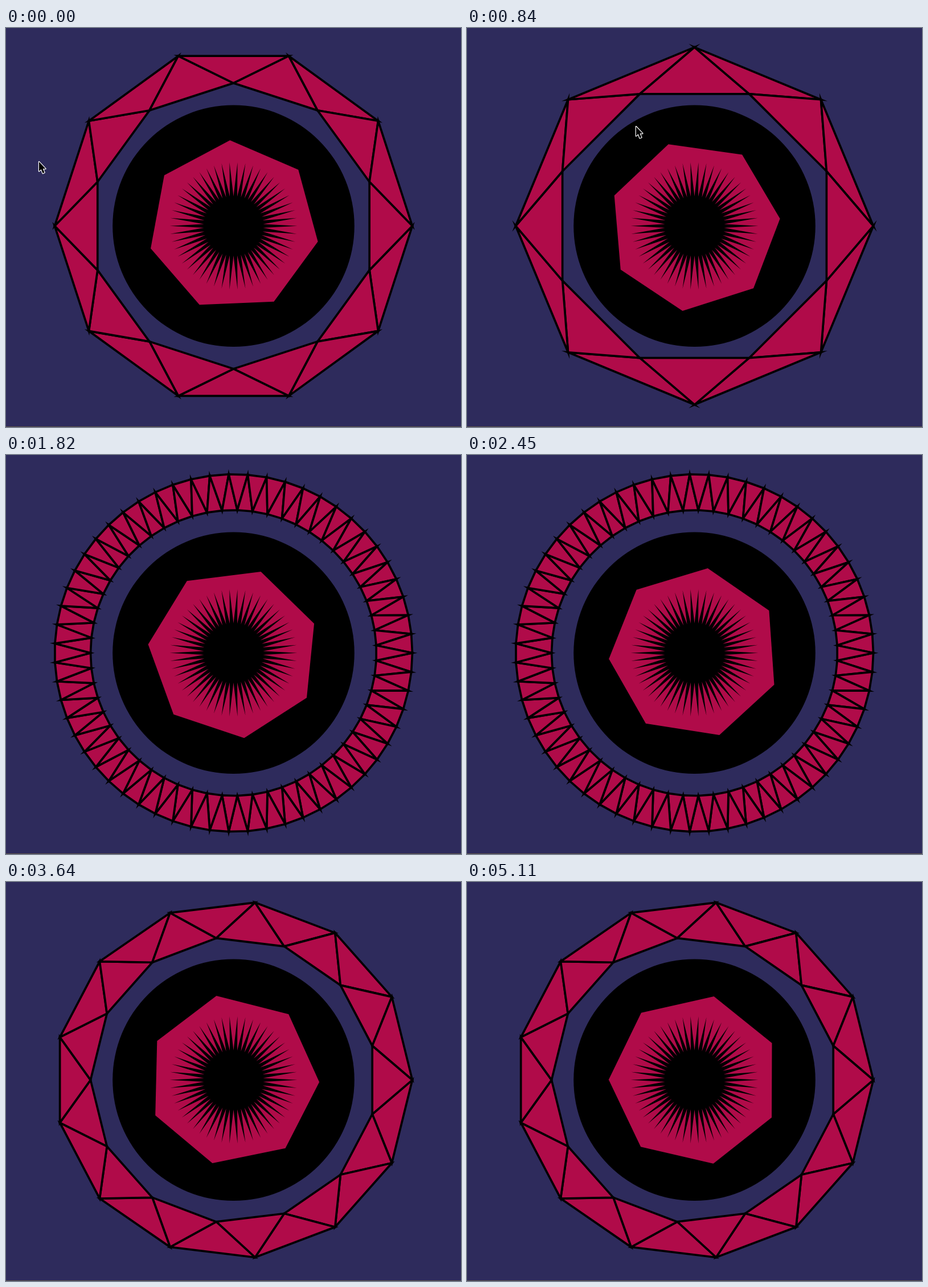
Animation of 799x701 px, one loop 5.18 s. Source, as an HTML page with a canvas:

```html
<!DOCTYPE html>
<html lang="en">
<head>
<meta charset="utf-8">
<title>Triangle strip ring</title>
<style>
  html, body { margin: 0; width: 100%; height: 100%; overflow: hidden; background: #2e2b5c; }
  canvas { display: block; }
</style>
</head>
<body>
<canvas id="stage" width="799" height="701"></canvas>
<script>
const canvas = document.getElementById('stage');
const ctx = canvas.getContext('2d');
const STEP = 70, STEPS = 74, TAU = Math.PI * 2;
const CX = 399.5, CY = 347.8;
const NAVY = '#2e2b5c', CRIMSON = '#b00b49';

// Pointer swipes across the stage; between them it stays out of view.
const swipes = [
  { start: 0, end: 3, from: [57, 234], to: [28, 215] },
  { start: 11, end: 16, from: [28, 215], to: [772, 96] },
  { start: 36, end: 39, from: [772, 250], to: [10, 290] },
  { start: 48, end: 49, from: [10, -40], to: [100, -40] }
];

const clamp = t => Math.min(1, Math.max(0, t));
const easeOut = t => 1 - (1 - t) ** 2;
const mix = (a, b, t) => a + (b - a) * t;

function pointerAt(step) {
  const { start, end, from, to } = swipes.filter(s => s.start <= Math.max(0, step)).pop();
  const t = clamp((step - start) / (end - start));
  const [x, y] = from.map((v, i) => mix(v, to[i], easeOut(t)));
  return { x, y, visible: t < 0.75 };
}

// The ring follows the pointer's x one step late: 6 points at the left edge, 60 at the right.
const countAt = step => Math.ceil(mix(6, 60, pointerAt(step - 1).x / canvas.width));

// The heptagon turns back steadily, a little slower while the dense ring is drawn.
function angleAt(step) {
  const slowSteps = clamp((step - 12) / 30) * 30;
  return (10.5 - 1.28 * step + 0.2 * slowSteps) * Math.PI / 180;
}

function trace(points) {
  ctx.beginPath();
  points.forEach(p => ctx.lineTo(...p));
  ctx.closePath();
}

function fillShape(points, color) {
  trace(points);
  ctx.fillStyle = color;
  ctx.fill();
}

// Points around the centre, cycling through the given radii.
const around = (total, radii, start = 0) => Array.from({ length: total }, (_, i) => {
  const radius = radii[i % radii.length], angle = start + i * TAU / total;
  return [radius * Math.cos(angle), radius * Math.sin(angle)];
});

function drawRing(count) {
  const strip = around(count * 2, [314, 251]);
  ctx.strokeStyle = '#000';
  ctx.lineWidth = 3.7;
  ctx.lineJoin = 'miter';
  strip.forEach((p, i) => {
    fillShape([p, strip[(i + 1) % strip.length], strip[(i + 2) % strip.length]], CRIMSON);
    ctx.stroke();
  });
}

function drawPointer({ x, y }) {
  ctx.save();
  ctx.translate(x + 1, y + 1);
  trace([[0, 0], [0, 16.5], [3.8, 13.2], [6.6, 20.3], [9.6, 19], [6.7, 12.2], [11.5, 12.2]]);
  ctx.lineWidth = 2.4;
  ctx.lineJoin = 'round';
  ctx.strokeStyle = '#fff';
  ctx.stroke();
  ctx.fillStyle = '#000';
  ctx.fill();
  ctx.restore();
}

function draw(step) {
  ctx.fillStyle = NAVY;
  ctx.fillRect(0, 0, canvas.width, canvas.height);
  ctx.fillStyle = '#5f5549';
  ctx.fillRect(0, canvas.height - 1, canvas.width, 1);

  ctx.save();
  ctx.translate(CX, CY);
  drawRing(countAt(step));
  ctx.beginPath();
  ctx.arc(0, 0, 212.3, 0, TAU);
  ctx.fillStyle = '#000';
  ctx.fill();
  fillShape(around(7, [150.7], angleAt(step)), CRIMSON);
  fillShape(around(100, [112, 52]), '#000');
  ctx.restore();

  const pointer = pointerAt(step);
  if (pointer.visible) drawPointer(pointer);
}

const startTime = performance.now();
function tick() {
  draw(Math.floor((performance.now() - startTime) / STEP) % STEPS);
  requestAnimationFrame(tick);
}
tick();
</script>
</body>
</html>
```
